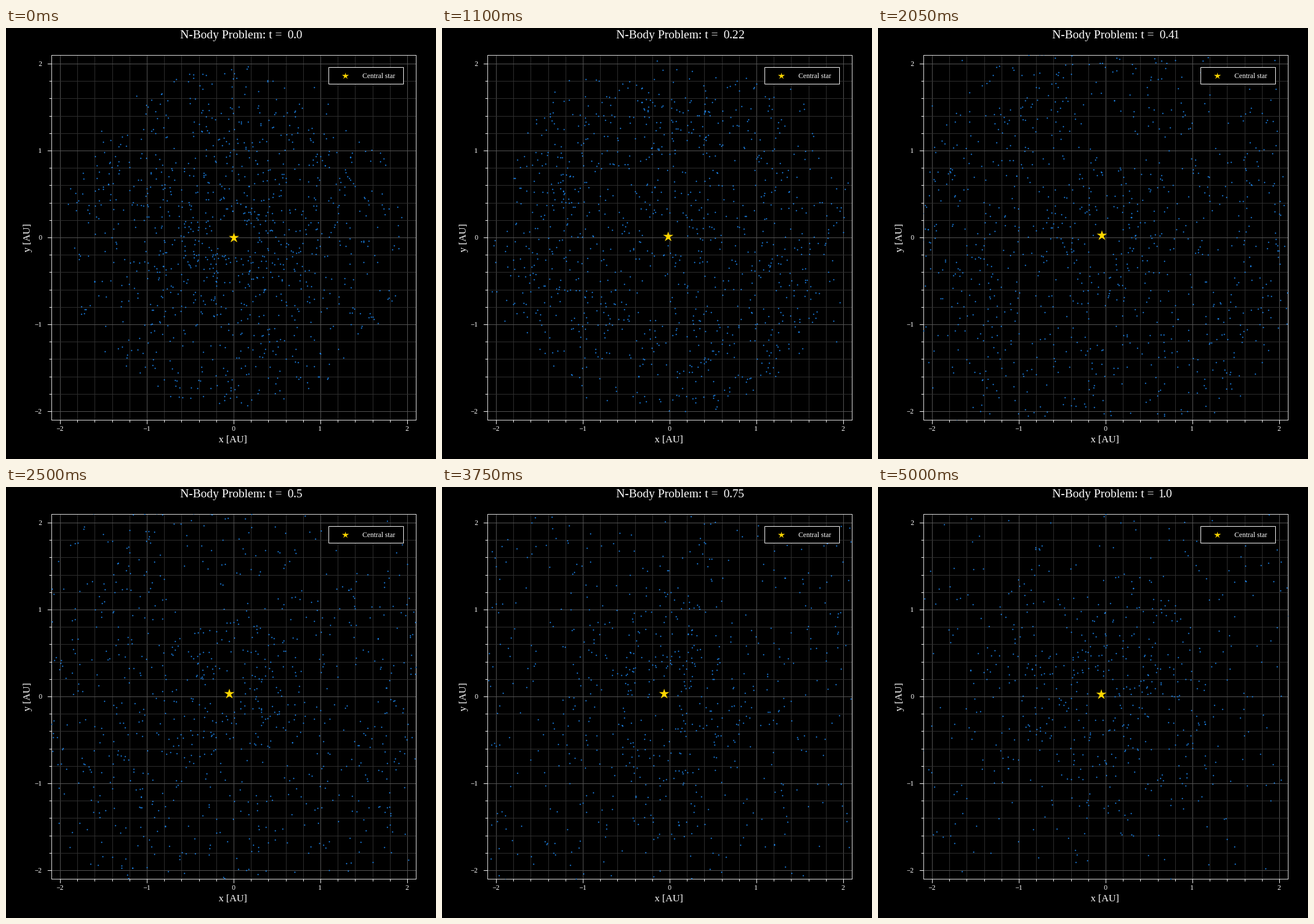
These frames come from a looping animation (748x749 px, 5050 ms). A matplotlib script:

```python
import numpy as np
import matplotlib.pyplot as plt
from matplotlib.animation import FuncAnimation
from matplotlib.patches import Rectangle

W, H, DPI = 748, 749, 64
PX = 72 / DPI                      # one pixel in points
LEFT, RIGHT, TOP, BOTTOM = 79, 713, 47, 681
CX, CY = (LEFT + RIGHT) / 2, (TOP + BOTTOM) / 2
LIMIT = 2.1
SCALE = (RIGHT - LEFT) / (2 * LIMIT)
FRAMES, INTERVAL = 101, 50
BODIES = 1000
GM = 4 * np.pi ** 2                # AU^3 / yr^2
BLUE, GOLD = "#1e90ff", "#ffd700"

plt.rcParams["font.family"] = "Liberation Serif"

# Slow drift of the central star, in pixels from the origin
drift_t = [0, 0.11, 0.33, 0.5, 0.65, 0.86, 1.0]
drift_x = np.polyfit(drift_t, [0, -0.9, -5, -8.1, -9.8, -9.9, -8.3], 4)
drift_y = np.polyfit(drift_t, [0, 0.3, 3.3, 4.7, 5.2, 4.8, 3.7], 4)


def star_at(t):
    return np.array([np.polyval(drift_x, t), np.polyval(drift_y, t)]) / SCALE


def pull(pos, t, soft=0.04):
    d = pos - star_at(t)
    r2 = (d ** 2).sum(axis=1, keepdims=True) + soft ** 2
    return -GM * d / r2 ** 1.5


def simulate(substeps=40):
    """Leapfrog orbits around the drifting star, one snapshot per frame."""
    rng = np.random.default_rng(11)
    r = 0.2 + 1.78 * rng.uniform(0, 1, BODIES) ** 0.82
    a = rng.uniform(0, 2 * np.pi, BODIES)
    speed = np.sqrt(GM / r) * rng.normal(1.12, 0.16, BODIES)
    pos = np.column_stack([r * np.cos(a), r * np.sin(a)])
    vel = np.column_stack([-speed * np.sin(a), speed * np.cos(a)])
    dt = 1 / (FRAMES - 1) / substeps
    t, track = 0.0, [pos.copy()]
    for _ in range(FRAMES - 1):
        for _ in range(substeps):
            vel += pull(pos, t) * dt / 2
            pos += vel * dt
            t += dt
            vel += pull(pos, t) * dt / 2
        track.append(pos.copy())
    return track


track = simulate()

fig = plt.figure(figsize=(W / DPI, H / DPI), dpi=DPI, facecolor="black")
ax = fig.add_axes([LEFT / W, 1 - BOTTOM / H,
                   (RIGHT - LEFT) / W, (BOTTOM - TOP) / H], facecolor="black")
ax.set(xlim=(-LIMIT, LIMIT), ylim=(-LIMIT, LIMIT))


def label(x, y, text, size, **kw):
    kw = {"ha": "left", "va": "baseline", "color": "white", **kw}
    return fig.text(x / W, 1 - y / H, text, fontsize=size * PX, **kw)


def star(x, y, size, **kw):
    return ax.plot([x], [y], "*", ms=size * PX, mfc=GOLD, mec="none", **kw)[0]


# Axes, ticks and grid
majors = range(-2, 3)
minors = np.arange(-10, 11) / 5
for axis in (ax.xaxis, ax.yaxis):
    axis.set_ticks(majors, labels=[""] * 5)
    axis.set_ticks(minors, minor=True)
ax.tick_params(which="major", length=7 * PX, width=PX, color="white")
ax.tick_params(which="minor", length=4 * PX, width=PX, color="white")
ax.grid(which="minor", color="#2f2f2f", lw=PX)
ax.grid(which="major", color="#555555", lw=PX)
ax.set_axisbelow(True)
for spine in ax.spines.values():
    spine.set(color="#e6e6e6", linewidth=PX)

for v in majors:
    text = str(v).replace("-", "\u2212")
    label(CX - 0.6 + v * SCALE, 700, text, 12.3, ha="center")
    label(62.5, CY + 4.3 - v * SCALE, text, 12.3, ha="right")
label(394.5, 720.5, "x [AU]", 17.2, ha="center")
label(42, 364.5, "y [AU]", 17.2, ha="center", rotation=90,
      rotation_mode="anchor")

# Bodies and star
dots, = ax.plot([], [], "o", ms=2.1 * PX, mfc=BLUE, mec="none", zorder=3)
sun = star(0, 0, 19, zorder=4)

# Legend
ax.add_patch(Rectangle(((561 - CX) / SCALE, (CY - 97) / SCALE),
                       130 / SCALE, 29 / SCALE, fc="black", ec="white",
                       lw=PX, zorder=5))
star((590.3 - CX) / SCALE, (CY - 82.7) / SCALE, 12.5, zorder=6)
label(619.5, 87, "Central star", 12.3)

# Title and counter; the digit 1 is set tight
TITLE = 20.9
label(303, 18, "N-Body Problem: t =", TITLE)
digits = [label(488.5, 18, "", TITLE) for _ in range(4)]
ADVANCE = {".": 0.25 * TITLE, "1": 0.31 * TITLE}


def show_time(t):
    x = 488.8
    for item, ch in zip(digits, str(round(t, 2)).ljust(4)):
        item.set_text(ch.strip())
        item.set_x((x - (2 if ch == "1" else 0)) / W)
        x += ADVANCE.get(ch, 0.5 * TITLE)


def update(i):
    t = i / (FRAMES - 1)
    dots.set_data(track[i][:, 0], track[i][:, 1])
    x, y = star_at(t)
    sun.set_data([x], [y])
    show_time(t)
    return [dots, sun, *digits]


anim = FuncAnimation(fig, update, frames=FRAMES, interval=INTERVAL,
                     init_func=lambda: update(0), repeat=True,
                     repeat_delay=0, blit=False)
plt.show()
```
